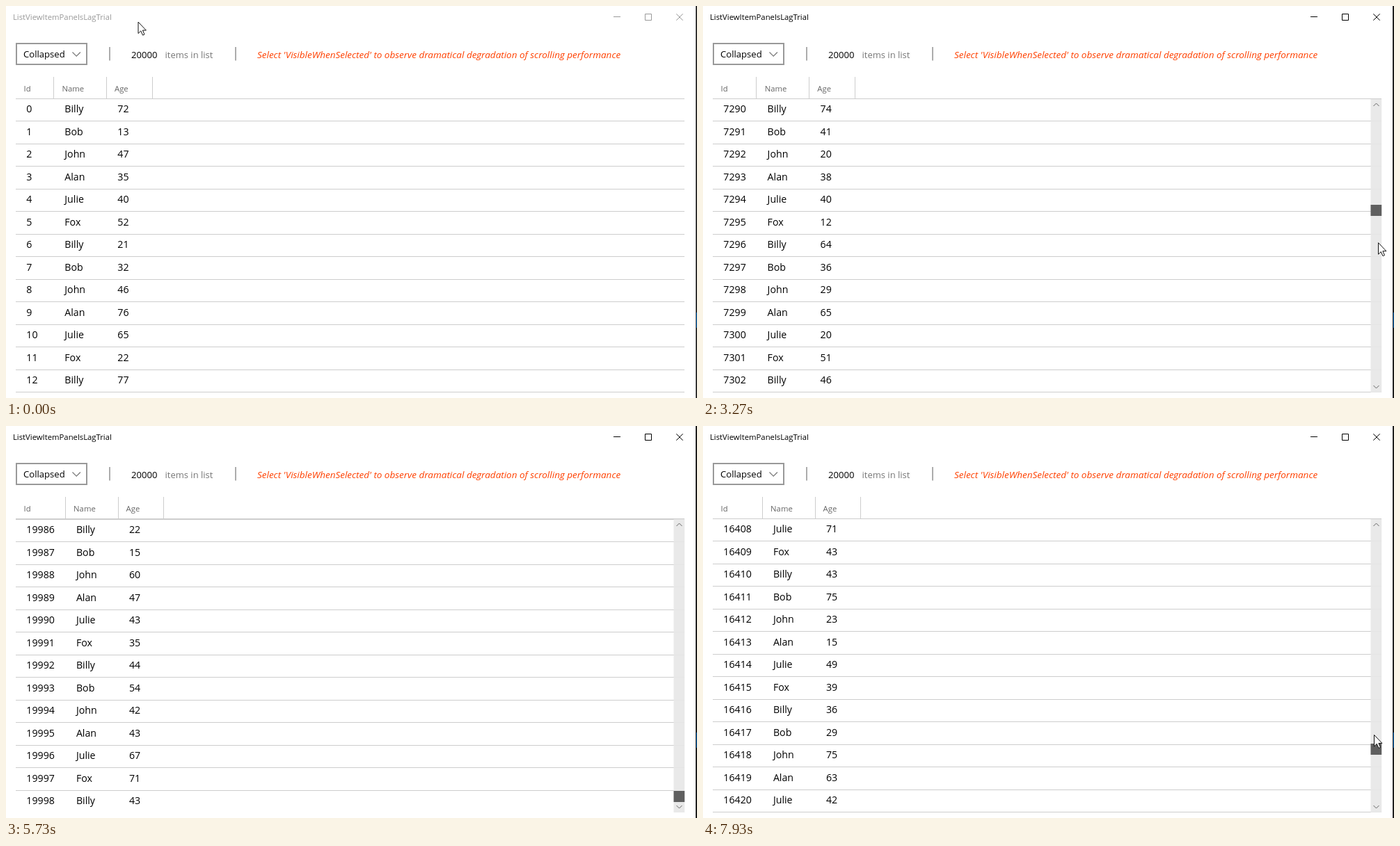
An HTML page that plays this animation: 993x564 px, repeating every 8000 ms.

```html
<!DOCTYPE html>
<html lang="en">
<head>
<meta charset="utf-8">
<title>Grid scrolling</title>
<style>
  html, body { margin: 0; width: 100%; height: 100%; overflow: hidden; background: #fff; }
  svg { display: block; font-family: "Open Sans", "Noto Sans", sans-serif; }
  .small { font-size: 11.3px; }
  .bar { font-size: 13.1px; }
  .cell { font-size: 14.2px; }
  .line { fill: #cdcdcd; }
  .icon { fill: none; }
</style>
</head>
<body>
<svg id="stage" width="993" height="564" viewBox="0 0 993 564">
  <rect width="993" height="564" fill="#fff"/>
  <text id="caption" class="small" x="10" y="19.5">ListViewItemPanelsLagTrial</text>
  <path id="buttons" class="icon" d="M873 15.5h10M918.5 11.5h9v9h-9zM963.3 11.3l9.4 9.4M972.7 11.3l-9.4 9.4"/>

  <rect x="15" y="54" width="101" height="30" fill="#fff" stroke="#999" stroke-width="2"/>
  <text class="bar" x="25" y="74">Collapsed</text>
  <path class="icon" d="M95.5 66.5l5.7 5.7 5.7-5.7" stroke="#777" stroke-width="1.2"/>
  <path class="icon" d="M149 59v19.5M330 59v19.5" stroke="#999" stroke-width="1.6"/>
  <text class="bar" x="180" y="75">20000</text>
  <text x="228.5" y="75" font-size="13" fill="#777">items in list</text>
  <text x="361" y="75" font-size="13.52" font-style="italic" fill="#ff4000">Select 'VisibleWhenSelected' to observe dramatical degradation of scrolling performance</text>

  <g id="head" class="small" fill="#666"></g>
  <g id="rows"></g>
  <rect class="line" x="14" y="133" width="961" height="1"/>

  <rect id="thin" x="971.3" y="149.5" width="1.7" height="16" fill="#6e6e6e"/>
  <g id="scroll">
    <rect x="959.5" y="134" width="15.7" height="422" fill="#e8e8e8" fill-opacity=".93"/>
    <path class="icon" d="M963.5 144l4-4 4 4M963.5 546l4 4 4-4" stroke="#666"/>
    <rect id="thumb" x="959.5" width="15.7" height="16"/>
  </g>

  <rect id="edge" x="991" width="1" height="564"/>
  <rect x="992" width="1" height="564" fill="#1e1e1e"/>
  <rect x="992" y="441" width="1" height="22" fill="#0a6cbd"/>
  <path id="cursor" d="M.5.5V17l3.8-3.6 2.7 6.100 2.500-1.100-2.600-5.900h5z" fill="#fff" stroke="#111"/>
</svg>
<script>
const LOOP = 8000, STEPS = 120;
const LAST = 19986, ROWS = 13, PITCH = 32.48, TOP = 133;
const OPEN = 34, ACTIVE = 37, DRAG = 44;
const NAMES = ['Billy', 'Bob', 'John', 'Alan', 'Julie', 'Fox'];

// Turning points as [step, ...values], eased in between.
const APPROACH = [
  [2, 189.5, 22.5], [17, 422, 307], [25, 955, 85], [29, 974.5, 108.5], [38, 970, 153]
];
const SWAY = [
  [57, 970], [61, 1000], [71, 985], [86, 1000], [101, 964.5], [110, 985], [119, 964]
];
const SCROLL = [
  [44, 0], [55, 17000], [67, 850], [79, 19300], [85, 19300], [86, LAST],
  [96, 0], [112, 19364], [139, 522]
];

const $ = id => document.getElementById(id);

function set(el, attrs) {
  for (const key in attrs) el.setAttribute(key, attrs[key]);
}

function add(parent, tag, attrs) {
  const el = document.createElementNS('http://www.w3.org/2000/svg', tag);
  set(el, attrs);
  return parent.appendChild(el);
}

const ease = k => (1 - Math.cos(Math.PI * k)) / 2;

function swing(points, at) {
  const n = points.findIndex(p => p[0] >= at);
  if (n < 1) return points.at(n).slice(1);
  const [from, ...a] = points[n - 1];
  const [to, ...b] = points[n];
  const k = ease((at - from) / (to - from));
  return a.map((v, i) => v + (b[i] - v) * k);
}

function ageOf(id) {
  const r = Math.sin((id + 1) * 12.9898) * 43758.5453;
  return 10 + Math.floor((r - Math.floor(r)) * 68);
}

const firstId = step => Math.round(swing(SCROLL, step)[0]);

// While dragging, the rows lag a little behind the pointer.
function pointer(step) {
  if (step < DRAG) return swing(APPROACH, step);
  const ahead = swing(SCROLL, step + 1.1)[0];
  return [swing(SWAY, step)[0], 153.5 + 375 * ahead / LAST];
}

// The Id column widens with the longest id shown so far.
function widening(step) {
  let top = 0;
  for (let s = DRAG; s <= step; s++) top = Math.max(top, firstId(s) + ROWS - 1);
  return Math.max(0, (String(top).length - 3) * 8.3);
}

const lineY = i => Math.round(TOP + PITCH * i);
const show = (el, on) => el.setAttribute('visibility', on ? 'visible' : 'hidden');

const heads = [['Id', 25.5, 68.5], ['Name', 80.5, 144.5], ['Age', 156, 210.2]].map(([label, x, sep]) => {
  const text = add($('head'), 'text', { y: 123 });
  text.textContent = label;
  const line = add($('head'), 'rect', { class: 'line', y: 102, width: 1, height: 31 });
  return { text, line, x, sep };
});

const rows = Array.from({ length: ROWS }, (_, i) => {
  const y = lineY(i), next = lineY(i + 1);
  const back = add($('rows'), 'rect', { x: 14, y, width: 961, height: next - y, fill: '#e6e6e6' });
  const cells = [0, 1, 2].map(() =>
    add($('rows'), 'text', { class: 'cell', y: Math.round(153.3 + PITCH * i) }));
  return { back, cells, y, next };
});
const lines = Array.from({ length: ROWS + 1 }, (_, i) =>
  add($('rows'), 'rect', { class: 'line', x: 14, y: lineY(i), width: 961, height: 1 }));

function draw(time) {
  const step = Math.floor((time % LOOP + 4) * STEPS / LOOP) % STEPS;
  const first = firstId(step);
  const shift = widening(step);
  const atEnd = first === LAST;
  const active = step >= ACTIVE, open = step >= OPEN;

  $('caption').setAttribute('fill', active ? '#000' : '#999');
  $('buttons').setAttribute('stroke', active ? '#000' : '#999');
  $('edge').setAttribute('fill', active ? '#222' : '#555');

  heads.forEach((h, i) => {
    h.text.setAttribute('x', h.x + (i ? shift : 0));
    h.line.setAttribute('x', Math.floor(h.sep + shift));
  });

  // The last page sits one pixel lower, its bottom line out of view.
  $('rows').setAttribute('transform', `translate(0 ${atEnd ? 1 : 0})`);
  show(lines[ROWS], !atEnd);

  const hoverY = open ? 0 : pointer(step - 1)[1];
  const xs = [29.3, 84.3 + shift, 160.3 + shift];
  rows.forEach(({ back, cells, y, next }, i) => {
    const id = first + i;
    const texts = [id, NAMES[id % NAMES.length], ageOf(id)];
    show(back, hoverY >= y && hoverY < next);
    cells.forEach((cell, j) => {
      cell.setAttribute('x', xs[j]);
      cell.textContent = texts[j];
    });
  });

  const [x, y] = pointer(step);
  show($('thin'), !open && step >= 9);
  show($('scroll'), open);
  set($('thumb'), { y: Math.round(149.5 + 375 * first / LAST), fill: active ? '#5f5f5f' : '#8c8c8c' });
  $('cursor').setAttribute('transform', `translate(${x} ${y})`);
}

function tick(now) {
  draw(now);
  requestAnimationFrame(tick);
}
draw(0);
requestAnimationFrame(tick);
</script>
</body>
</html>
```
